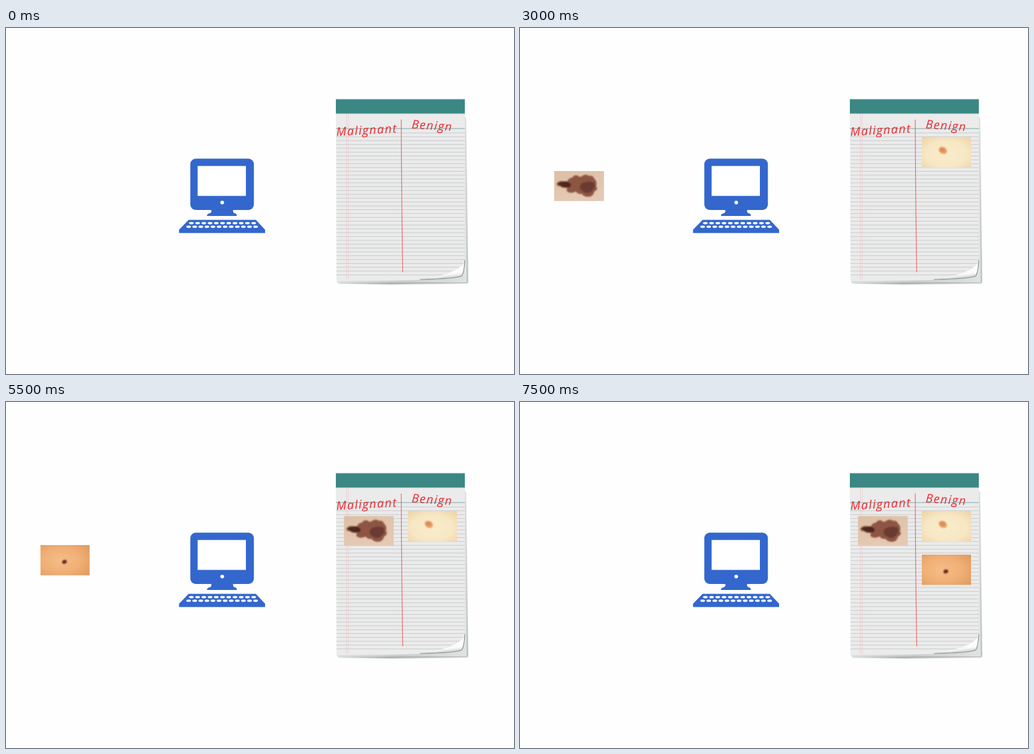
Animation, 847 px wide and 578 px high, one loop 8000 ms. Source, as an HTML page:

```html
<!DOCTYPE html>
<html lang="en">
<head>
<meta charset="utf-8">
<title>Sorting skin lesions</title>
<style>
html, body { margin: 0; width: 100%; height: 100%; overflow: hidden; background: #fefefe; }
svg { display: block; width: 847px; height: 578px; }
text { font: italic 400 20px "Open Sans", "Noto Sans", sans-serif; letter-spacing: 1.4px; fill: #f3282e; }
</style>
</head>
<body>
<svg viewBox="0 0 847 578">
  <defs>
    <filter id="blur" x="-10%" y="-10%" width="120%" height="120%"><feGaussianBlur stdDeviation="1.2"/></filter>
    <filter id="soft" x="-20%" y="-20%" width="140%" height="140%"><feGaussianBlur stdDeviation=".8"/></filter>
    <linearGradient id="curl" x1=".3" y1="0" x2=".6" y2="1">
      <stop offset=".2" stop-color="#e2e2e2"/><stop offset=".5" stop-color="#fff"/><stop offset=".8" stop-color="#fafafa"/><stop offset="1" stop-color="#c4c8c8"/>
    </linearGradient>
    <linearGradient id="under" x2="1">
      <stop stop-color="#d8e0df"/><stop offset=".5" stop-color="#c6cccb"/><stop offset="1" stop-color="#dfe4e3"/>
    </linearGradient>
    <radialGradient id="cream" cx=".5" cy=".55" r=".7">
      <stop stop-color="#f9eccb"/><stop offset=".6" stop-color="#f7e7c4"/><stop offset="1" stop-color="#eed4a9"/>
    </radialGradient>
    <linearGradient id="pink" x2=".4" y2="1"><stop stop-color="#dcc0a4"/><stop offset="1" stop-color="#e6c9b5"/></linearGradient>
    <radialGradient id="tan" cx=".42" cy=".5" r=".75">
      <stop stop-color="#f5bd87"/><stop offset=".5" stop-color="#f1b077"/><stop offset="1" stop-color="#e09a5c"/>
    </radialGradient>
  </defs>

  <!-- notepad -->
  <path d="M764 150L766 150L770 426L640 428L554 426Z" fill="#969b9b" filter="url(#blur)"/>
  <path d="M764 146L766 152L768.500 425L553 426L551 420Z" fill="url(#under)"/>
  <path d="M550 143H765V392Q766 412 755 416Q720 421 640 422L551 423Z" fill="#ebebeb"/>
  <g id="rules" stroke="#c6cacb"></g>
  <path d="M550 168H765" stroke="#6fa5aa"/>
  <path d="M567.500 144V420M570.500 144V420" stroke="#eac9cd" stroke-width=".8"/>
  <path d="M690 419Q735 414 750 404Q761 399 765 388Q766 413 757 415Q735 419 690 419Z" fill="url(#curl)"/>
  <path d="M690 420Q752 419 760 414Q764 408 765 388" fill="none" stroke="#878c8c" stroke-width="1.200"/>
  <path d="M550 119H765V143H550Z" fill="#3b8784"/>
  <path d="M550 119H765M550 143H765" stroke="#8fbab8" stroke-width=".8"/>
  <path d="M659 153Q659.500 290 661.500 408" fill="none" stroke="#f06468" stroke-width="1.200"/>
  <text transform="translate(551 180.500) rotate(-3.400)">Malignant</text>
  <text transform="translate(676 167.500) rotate(4)">Benign</text>

  <!-- computer -->
  <g fill="#3367cd">
    <rect x="307.300" y="218.300" width="106" height="85.700" rx="9"/>
    <path d="M342 303H379Q377 309 383 310Q385 311 385 314H335Q335 311 338 310Q344 309 342 303Z"/>
    <path d="M304.500 320.500H416.500L432 337V342.500H288.500V337Z"/>
  </g>
  <g id="keys" fill="#fff">
    <rect x="319.500" y="230.500" width="80.500" height="50"/>
    <circle cx="360.500" cy="291.500" r="3.100"/>
  </g>

  <!-- photos -->
  <g class="photo">
    <rect width="82" height="51.500" fill="url(#cream)"/>
    <g filter="url(#soft)">
      <ellipse cx="35" cy="22.500" rx="7.200" ry="5.600" transform="rotate(28 35 22.500)" fill="#e5a268"/>
      <ellipse cx="34.500" cy="21.500" rx="4.200" ry="3.200" fill="#dc8c52"/>
    </g>
  </g>
  <g class="photo">
    <rect width="83" height="50" fill="url(#pink)"/>
    <g filter="url(#soft)">
      <path d="M4 21Q8 15 15 17L22 17Q24 11 30 11Q34 5 40 8Q43 11 47 8Q53 4 58 8Q65 7 67 13Q72 17 70 25Q74 31 67 34Q65 43 57 43Q49 43 46 38Q39 39 36 34Q29 38 23 35Q19 33 22 28Q13 29 10 25Q4 26 4 21Z" fill="#8e5642"/>
      <path d="M5 21Q13 16 23 18Q31 22 26 27Q17 28 11 25Z" fill="#4d2720"/>
      <path d="M45 21Q56 15 66 19Q70 27 63 33Q55 40 48 34Q39 29 45 21Z" fill="#6b3a30"/>
    </g>
  </g>
  <g class="photo">
    <rect width="82" height="50.500" fill="url(#tan)"/>
    <g filter="url(#soft)">
      <ellipse cx="40" cy="28" rx="4" ry="3.300" transform="rotate(-25 40 28)" fill="#702a20"/>
    </g>
  </g>
</svg>
<script>
const STEP = 500, STEPS = 16, STOPS = 5;
// Each photo enters, approaches, is read on screen, leaves and is filed.
const routes = [
  [[47, 242], [151.5, 242.5], [319, 230], [442, 214.5], [670, 182]],
  [[57, 239], [161, 240], [318.5, 230.5], [441, 212], [563.5, 190.5]],
  [[57.5, 239], [165, 239], [319, 230.5], [441, 240], [670, 255]]
];
const photos = [...document.querySelectorAll(".photo")];

function add(parent, name, attrs) {
  const node = document.createElementNS("http://www.w3.org/2000/svg", name);
  for (const key in attrs) node.setAttribute(key, attrs[key]);
  document.getElementById(parent).append(node);
}

for (let i = 0; i < 38; i++) {
  const y = 175.3 + i * 6.41;
  add("rules", "path", { d: `M551 ${y}H${Math.min(765, 765 - (y - 395) * 2)}` });
}
for (const [count, x, y, gap] of [[11, 309, 326, 10.4], [12, 304.5, 332, 10.15]]) {
  for (let i = 0; i < count; i++) add("keys", "ellipse", { cx: x + i * gap, cy: y, rx: 3.9, ry: 1.9 });
}

function draw(now) {
  const step = Math.floor(now / STEP) % STEPS;
  photos.forEach((photo, i) => {
    const stop = Math.min(step - 1 - i * STOPS, STOPS - 1);
    photo.style.display = stop < 0 ? "none" : "";
    if (stop >= 0) photo.setAttribute("transform", `translate(${routes[i][stop]})`);
  });
  requestAnimationFrame(draw);
}
draw(performance.now());
</script>
</body>
</html>
```
